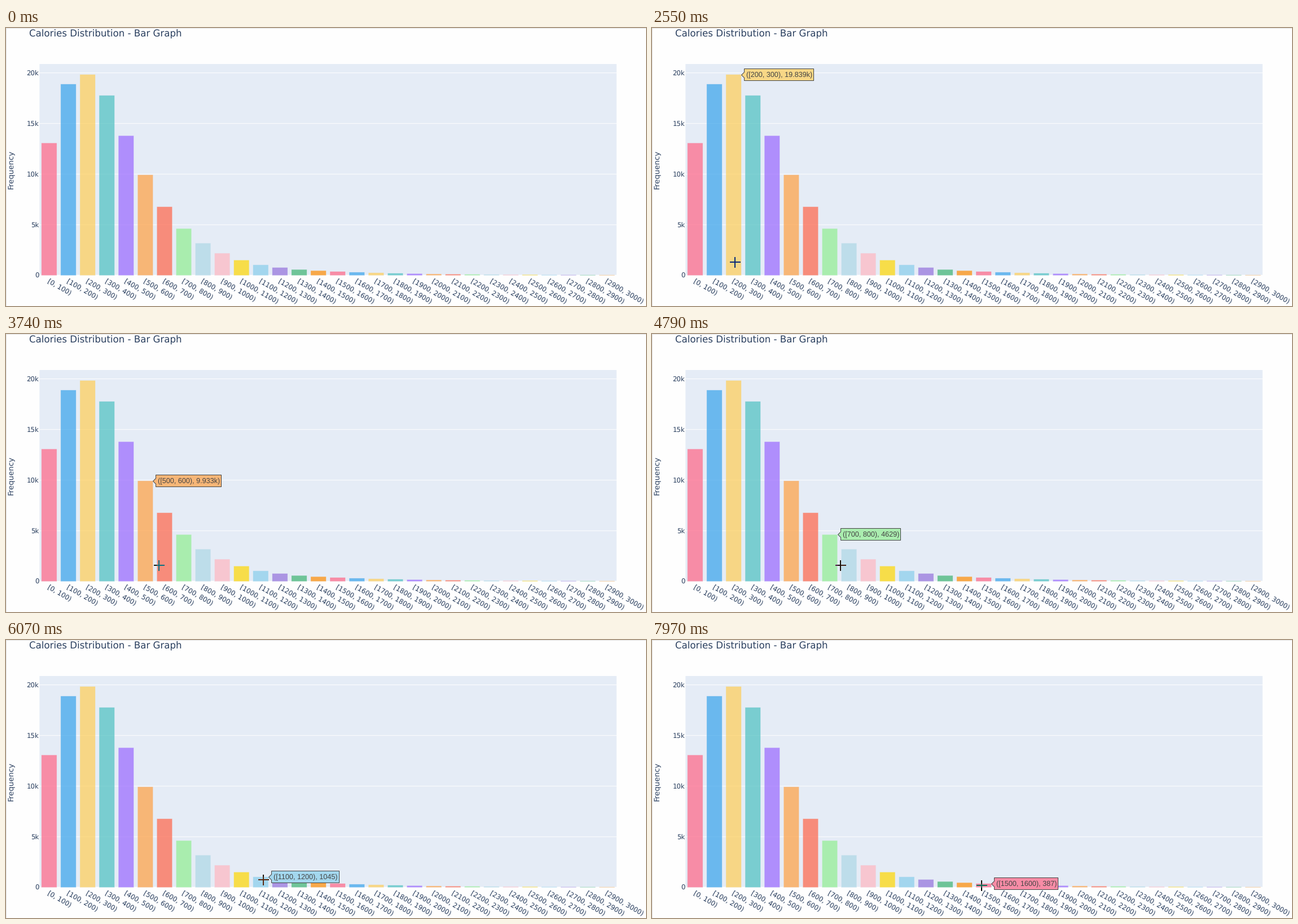
Write a matplotlib script that moves like this. It is 1134 px wide and 494 px high and loops after 7990 ms.

```python
import numpy as np
import matplotlib.pyplot as plt
from matplotlib.animation import FuncAnimation
from matplotlib.colors import to_rgb
from matplotlib.patches import Polygon, Rectangle

W, H, DPI = 1134, 494, 64
PT = 72 / DPI  # points per pixel
LOOP_MS, STEP_MS = 7990, 34

BINS = 30
LEFT, RIGHT, TOP, BASE = 59.4, 1081.8, 64, 439.7
PER_UNIT = 0.018
SLOT = (RIGHT - LEFT) / BINS
BAR_W = 0.8 * SLOT
PAPER, PLOT_BG, INK, HOVER_INK = "#fefefe", "#e5ecf6", "#2a3f5f", "#444444"
OPACITY = 0.7

# Counts decay geometrically between these bins
KEY_COUNTS = {0: 13080, 1: 18890, 2: 19839, 3: 17770, 4: 13800, 5: 9933,
              7: 4629, 11: 1045, 13: 587, 15: 387, 20: 150, 29: 45}
log_counts = np.interp(range(BINS), list(KEY_COUNTS), np.log(list(KEY_COUNTS.values())))
COUNTS = np.rint(np.exp(log_counts)).astype(int)

PALETTE = ["#ff6384", "#36a2eb", "#ffce56", "#4bc0c0", "#9966ff", "#ff9f40",
           "tomato", "lightgreen", "lightblue", "lightpink", "gold", "skyblue",
           "mediumpurple", "mediumseagreen", "darkorange"]

# Pointer stops: time in ms, x, y
STOPS = [(840, 332, 480), (980, 252, 494), (1260, 252, 494), (1632, 101, 433),
         (2000, 85, 415), (2150, 85, 415), (2550, 147, 416), (2870, 160, 415),
         (3740, 271, 411), (4060, 293, 409), (4420, 293, 409), (5200, 386, 413),
         (6060, 457, 426), (6790, 522, 435), (7560, 584, 435.5)]
STOP_T, STOP_X, STOP_Y = zip(*STOPS)
HOVER_DELAY = 60


def hue(i):
    return PALETTE[i % len(PALETTE)]


def mixed(i):
    """Bar colour as it appears over the plot background."""
    return OPACITY * np.array(to_rgb(hue(i))) + (1 - OPACITY) * np.array(to_rgb(PLOT_BG))


def bar_left(i):
    return LEFT + i * SLOT + (SLOT - BAR_W) / 2


def bar_top(i):
    return BASE - COUNTS[i] * PER_UNIT


def bin_name(i):
    return f"[{100 * i}, {100 * (i + 1)})"


def pointer(t):
    return np.interp(t, STOP_T, STOP_X), np.interp(t, STOP_T, STOP_Y)


def slot_at(x):
    return int(np.clip((x - LEFT) // SLOT, 0, BINS - 1))


def color_at(x, y):
    if y > BASE:
        return np.ones(3)
    i = slot_at(x)
    in_bar = 0 <= x - bar_left(i) <= BAR_W and y >= bar_top(i)
    return mixed(i) if in_bar else np.array(to_rgb(PLOT_BG))


plt.rcParams["text.hinting"] = "none"
fig = plt.figure(figsize=(W / DPI, H / DPI), dpi=DPI, facecolor=PAPER)
ax = fig.add_axes([0, 0, 1, 1])
ax.axis("off")


def label(x, y, s, size, **kw):
    style = dict(fontsize=size * PT, color=INK, family="DejaVu Sans", va="baseline")
    return ax.text(x, y, s, **{**style, **kw})


def rect(x, y, w, h, **kw):
    ax.add_patch(Rectangle((x, y), w, h, **{"lw": 0, "snap": False, **kw}))


# Frame edge, plot area and grid
rect(0, 0, W, 1, color="#e2e2e2")
rect(0, 0, 1, H, color="#e2e2e2")
rect(LEFT, TOP, RIGHT - LEFT, BASE - TOP, color=PLOT_BG)
for value in range(0, 20001, 5000):
    y = BASE - value * PER_UNIT
    ax.plot([LEFT, RIGHT], [y, y], color="white", lw=(1 if value else 2) * PT,
            snap=False, zorder=1.5)
    label(58.4, y + 4.2, f"{value // 1000}k" if value else "0", 11.7, ha="right")

for i in range(BINS):
    rect(bar_left(i), bar_top(i), BAR_W, BASE - bar_top(i), alpha=OPACITY,
         fc=hue(i), ec=PLOT_BG, lw=0.5 * PT, zorder=2)
    label(LEFT + (i + 0.5) * SLOT - 3.8, 452, bin_name(i), 11.7,
          rotation=-30, rotation_mode="anchor")

label(41, 15.4, "Calories Distribution - Bar Graph", 16.6)
label(13, 251.5, "Frequency", 13.4, rotation=90, rotation_mode="anchor", ha="center")

# Hover label and pointers
bubble = ax.add_patch(Polygon([(0, 0)] * 3, ec=HOVER_INK, lw=PT, zorder=6))
bubble_text = label(0, 0, "", 12.6, family="Liberation Sans", color=HOVER_INK, zorder=7)
ARROW = np.array([(0, 0), (0, 16), (4, 13), (6, 18), (8, 17), (6, 12), (11, 12)])
arrow = ax.add_patch(Polygon(ARROW, fc="white", ec="black", lw=PT, zorder=8))
SIZE, MID = 19, 9
cross = ax.imshow(np.zeros((SIZE, SIZE, 4)), aspect="auto", interpolation="nearest", zorder=9)
ax.set_xlim(0, W)
ax.set_ylim(H, 0)


def draw_cross(x, y):
    """Crosshair that inverts whatever lies below it."""
    x0, y0 = round(x) - MID, round(y) - MID
    cells = np.zeros((SIZE, SIZE, 4))
    for r, c in np.ndindex(SIZE, SIZE):
        if {r, c} & {MID - 1, MID}:
            cells[r, c, :3] = 1 - color_at(x0 + c + 0.5, y0 + r + 0.5)
            cells[r, c, 3] = 1
    cross.set_data(cells)
    cross.set_extent((x0, x0 + SIZE, y0 + SIZE, y0))


def draw_bubble(i):
    count = COUNTS[i]
    amount = f"{count / 1000:.5g}k" if count > 9000 else str(count)
    x, y = round(bar_left(i) + BAR_W) + 0.5, round(bar_top(i)) + 0.5
    bubble_text.set_text(f"({bin_name(i)}, {amount})")
    bubble_text.set_position((x + 8.5, y + 3.8))
    left, top, bottom = x + 5, y - 11, y + 10
    right = left + round(bubble_text.get_window_extent().width) + 6
    bubble.set_xy([(x, y), (left, y + 5), (left, bottom), (right, bottom),
                   (right, top), (left, top), (left, y - 5)])
    bubble.set_facecolor(mixed(i))


def update(frame):
    t = frame * STEP_MS
    x, y = pointer(t)
    entered = t >= STOP_T[0]
    inside = entered and y < BASE
    cross.set_visible(inside)
    arrow.set_visible(entered and not inside)
    arrow.set_xy(ARROW + (x, y))
    if inside:
        draw_cross(x, y)

    hover_x, hover_y = pointer(t - HOVER_DELAY)
    hovering = inside and hover_y < BASE
    bubble.set_visible(hovering)
    bubble_text.set_visible(hovering)
    if hovering:
        draw_bubble(slot_at(hover_x))
    return bubble, bubble_text, arrow, cross


anim = FuncAnimation(fig, update, frames=LOOP_MS // STEP_MS, interval=STEP_MS,
                     init_func=lambda: update(0), repeat=True, repeat_delay=0, blit=False)
plt.show()
```
